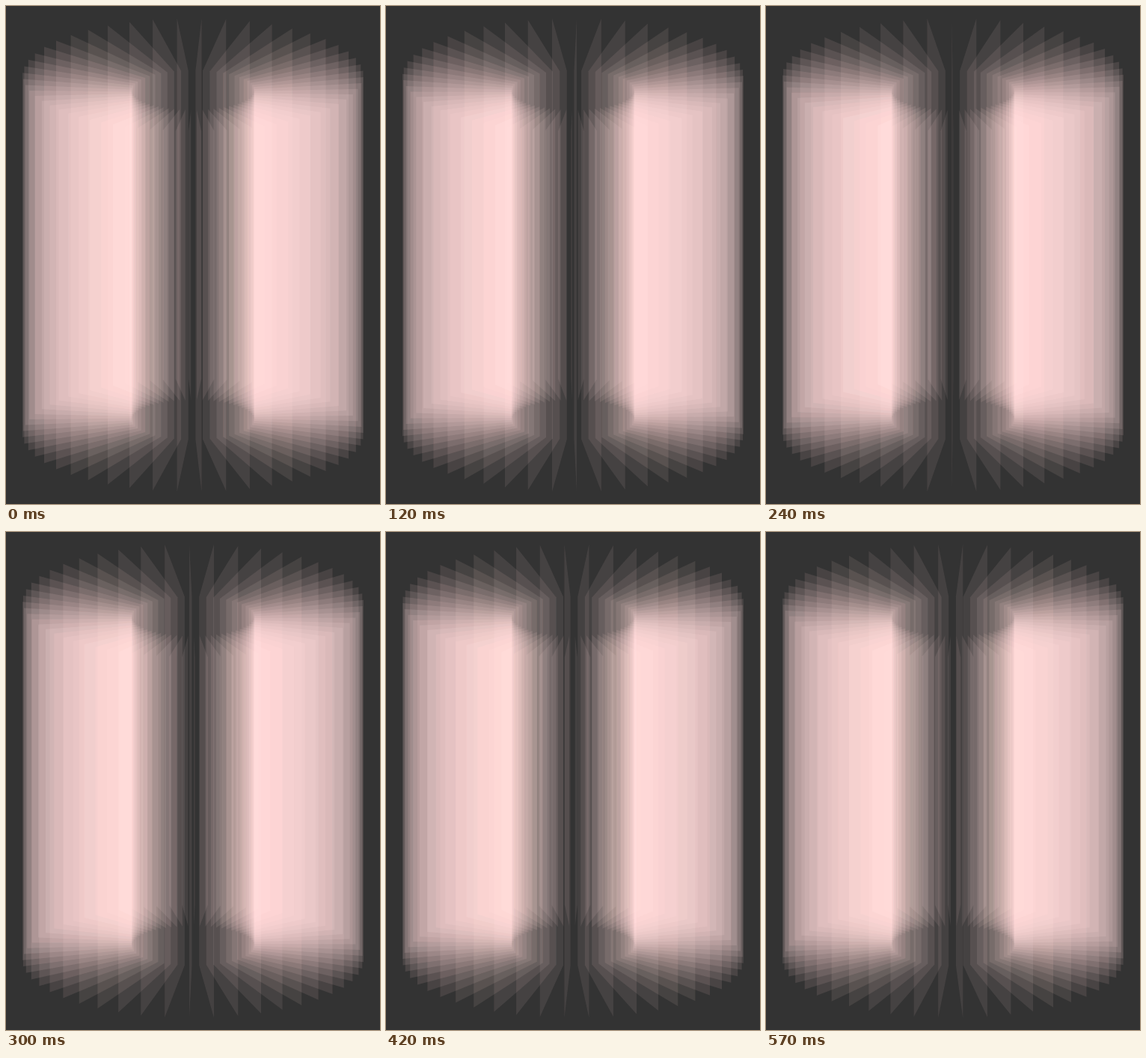
Write an HTML page with a canvas that moves like this. It is 500 px wide and 665 px high and loops after 600 ms.

```html
<!DOCTYPE html>
<html lang="en">
<head>
<meta charset="utf-8">
<title>Rotating panels</title>
<style>
  html, body { margin: 0; width: 100%; height: 100%; overflow: hidden; background: #333; }
  /* Brightening lets the densest overlaps clip to full red. */
  canvas { display: block; filter: brightness(1.1); }
</style>
</head>
<body>
<canvas id="stage" width="500" height="665"></canvas>
<script>
const ctx = document.getElementById('stage').getContext('2d');
const CX = 250, CY = 332.5;
const EYE = 687, OUTER = 216.4, INNER = 81.5, HALF = 217;
const COUNT = 60, LOOP = 600, TICK = 30;
const STEP = 2 * Math.PI / COUNT;
const START = 2.1 * Math.PI / 180;

// Perspective position of a vertical edge on the carousel.
function edge(radius, angle) {
  const scale = EYE / (EYE - radius * Math.cos(angle));
  return { x: CX + radius * Math.sin(angle) * scale, h: HALF * scale };
}

function panel(angle) {
  const a = edge(INNER, angle), b = edge(OUTER, angle);
  const alpha = 0.08 + 0.025 * Math.sin(angle) ** 2;
  ctx.fillStyle = `rgba(255, 212, 211, ${alpha})`;
  ctx.beginPath();
  ctx.moveTo(a.x, CY - a.h);
  ctx.lineTo(b.x, CY - b.h);
  ctx.lineTo(b.x, CY + b.h);
  ctx.lineTo(a.x, CY + a.h);
  ctx.fill();
}

function draw(now) {
  const time = Math.floor(now % LOOP / TICK) * TICK;
  const turn = START - STEP * time / LOOP;
  ctx.fillStyle = 'rgb(46, 46, 46)';
  ctx.fillRect(0, 0, 500, 665);
  for (let i = 0; i < COUNT; i++) panel(turn + i * STEP);
  requestAnimationFrame(draw);
}

draw(0);
</script>
</body>
</html>
```
